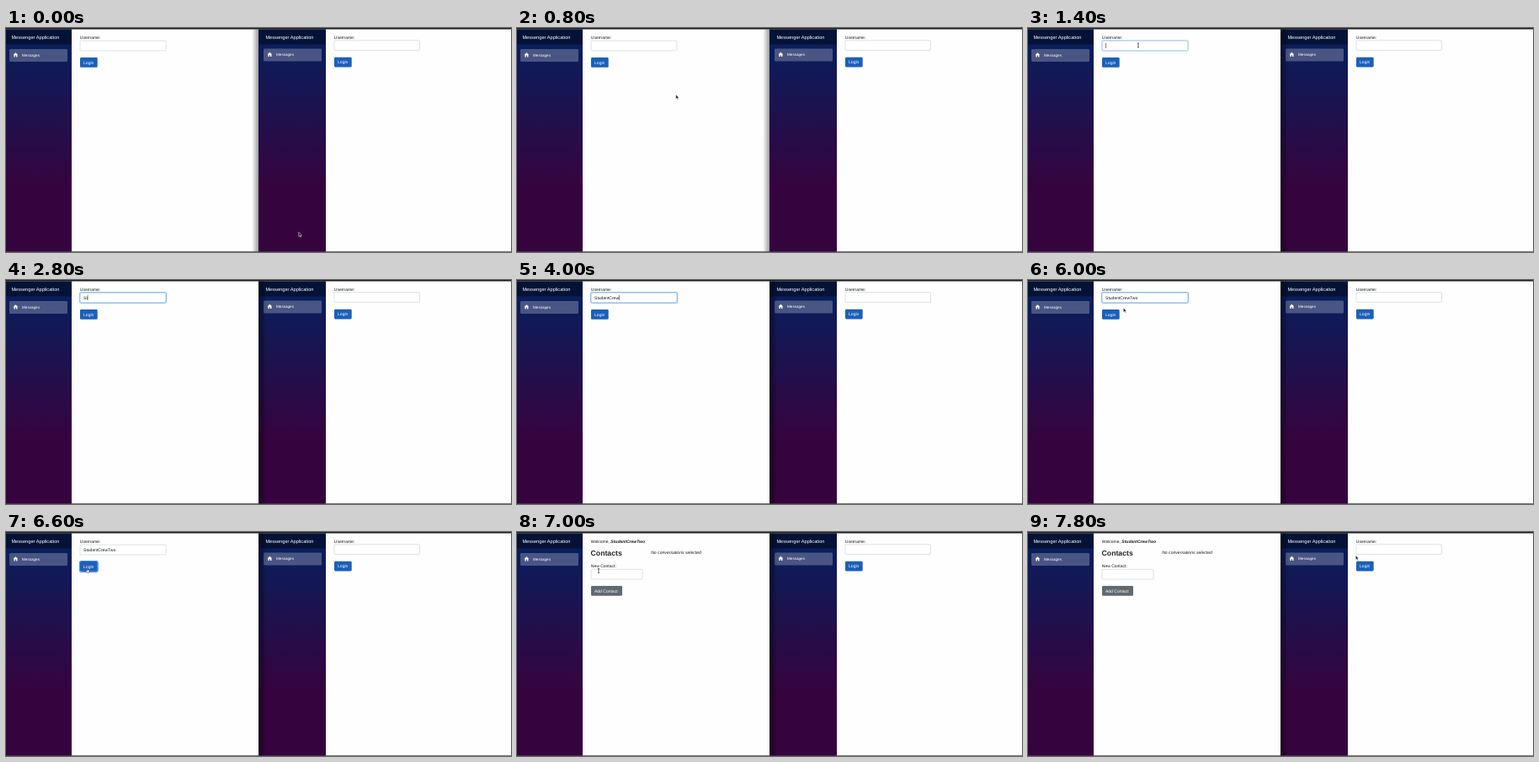
An HTML page for the animation above (8000 ms loop, 600x266 px).

```html
<!DOCTYPE html>
<html lang="en">
<head>
<meta charset="utf-8">
<title>Messenger Application</title>
<style>
html, body { margin: 0; width: 100%; height: 100%; overflow: hidden; background: #fefefe; }
svg { display: block; width: 100vw; height: 100vh; }
text { font: 5px "Liberation Sans", Arial, sans-serif; fill: #15181b; text-rendering: geometricPrecision; white-space: pre; }
.brand { font-size: 5.68px; fill: #fff; }
.nav { font-size: 4.6px; fill: #fff; }
.label { fill: #fff; }
.head { font-size: 8.7px; font-weight: bold; fill: #212529; }
.note { font-size: 5.1px; font-style: italic; }
.name { font-weight: bold; font-style: italic; }
.field { fill: #fff; stroke: #ced4da; stroke-width: .7; }
</style>
</head>
<body>
<svg viewBox="0 0 600 266" preserveAspectRatio="none">
  <defs>
    <linearGradient id="side" x1="0" y1="0" x2="0" y2="1">
      <stop offset="0" stop-color="#04215f"/>
      <stop offset=".7" stop-color="#35043f"/>
    </linearGradient>
    <linearGradient id="shadeL"><stop stop-color="#000" stop-opacity="0"/><stop offset="1" stop-color="#000" stop-opacity=".38"/></linearGradient>
    <linearGradient id="shadeR"><stop stop-color="#000" stop-opacity=".5"/><stop offset="1" stop-color="#000" stop-opacity="0"/></linearGradient>
    <g id="frame">
      <rect x="-2" y="1.5" width="80" height="265" fill="url(#side)"/>
      <rect x="-2" y="1.5" width="80" height="18" fill="#000" opacity=".42"/>
      <text class="brand" x="6.4" y="12.6">Messenger Application</text>
    </g>
    <g id="menu">
      <rect x="4" y="25" width="69" height="15" rx="1.3" fill="#fff" opacity=".25"/>
      <path d="M8.6 32 11.4 29.2 14.2 32H13.4V34.4H12V32.6H10.8V34.4H9.4V32Z" fill="#fff"/>
      <text class="nav" x="19" y="33.8">Messages</text>
    </g>
    <g id="prompt"><text x="87.8" y="13.1">Username:</text></g>
    <g id="login">
      <rect x="88" y="35.1" width="20.7" height="11.7" rx="1.3" fill="#1b60b9"/>
      <text class="label" x="92.1" y="42.7">Login</text>
    </g>
  </defs>

  <rect width="600" height="266" fill="#fefefe"/>
  <use href="#frame"/>
  <use href="#menu"/>

  <g id="signIn">
    <use href="#prompt"/>
    <rect id="ring" x="87.6" y="14.7" width="103" height="12.7" rx="1.8" fill="none" stroke="#9cc5f6" stroke-width="1.3"/>
    <rect id="box" class="field" x="88" y="15.1" width="102" height="11.8" rx="1.3"/>
    <text id="typed" x="92.1" y="22.8"></text>
    <rect id="caret" y="18" width=".6" height="6" fill="#222"/>
    <rect id="press" x="87.4" y="34.5" width="21.9" height="12.9" rx="1.9" fill="#fff" stroke="#3f92f0" stroke-width="1.1"/>
    <use href="#login"/>
  </g>

  <g id="contacts">
    <text x="87.8" y="13.1">Welcome, <tspan class="name" id="who"></tspan></text>
    <text class="head" x="87.6" y="28.3">Contacts</text>
    <text class="note" x="159.2" y="25.7">No conversations selected</text>
    <text x="87.8" y="42.2">New Contact:</text>
    <rect class="field" x="88" y="44.3" width="61" height="11.8" rx="1.3"/>
    <rect x="88" y="64" width="37" height="11.8" rx="1.3" fill="#626a71"/>
    <text class="label" x="92" y="71.7">Add Contact</text>
  </g>

  <rect id="overLeft" x="292" y="1.5" width="8" height="265" fill="url(#shadeL)"/>
  <g transform="translate(302)">
    <use href="#frame"/>
    <g transform="translate(0 -.4)">
      <use href="#menu"/>
      <use href="#prompt"/>
      <rect class="field" x="88" y="15.1" width="101.5" height="11.8" rx="1.3"/>
      <use href="#login"/>
    </g>
  </g>
  <rect id="overRight" x="300" y="1.5" width="9" height="265" fill="url(#shadeR)"/>
  <rect width="600" height="1.5" fill="#1d1d1f"/>
  <rect y="265.3" width="600" height=".7" fill="#444"/>

  <g id="mouse">
    <path id="arrow" d="M0 0V5.2L1.2 4.1 2 6 2.9 5.6 2.1 3.8H3.7Z" fill="#111" stroke="#fff" stroke-width=".5"/>
    <path id="beam" d="M-1-2.7Q0-2.7 0-2Q0-2.7 1-2.7M0-2V2M-1 2.7Q0 2.7 0 2Q0 2.7 1 2.7" fill="none" stroke="#222" stroke-width=".7"/>
    <path id="hand" d="M-.5-2.2Q0-2.8.4-2.2V-.4L2-.1Q2.5.1 2.4.7L1.8 2.8H-.9L-2.2.9Q-2.2.2-1.5.4L-.5 1Z" fill="#fff" stroke="#111" stroke-width=".5"/>
  </g>
</svg>
<script>
const LOOP = 8000, TICK = 200, USER = "StudentCrewTwo";
const $ = id => document.getElementById(id);
const show = (id, on) => $(id).setAttribute("visibility", on ? "visible" : "hidden");

// [time, letters typed]
const keys = [[0, 0], [2600, 1], [2800, 2], [3000, 4], [3200, 6], [3400, 7],
  [3800, 9], [4000, 11], [4800, 12], [5000, 13], [5200, 14]];
// [time, caret visible]
const blinks = [[0, 0], [1400, 1], [2000, 0], [2400, 1], [4600, 0], [4800, 1],
  [5600, 0], [6200, 1], [6400, 0]];
// [time, pointer shape]
const shapes = [[0, "arrow"], [1200, "beam"], [2600, ""], [5600, "beam"],
  [6000, "arrow"], [6200, "hand"], [7000, "beam"], [7400, "arrow"]];
// [time, x, y]
const path = [[0, 347.8, 242.3], [1200, 133, 22], [1400, 131, 20.5], [2000, 130, 21],
  [5600, 130, 21], [6400, 96.7, 45.2], [7000, 97, 46], [7200, 97, 46], [7800, 389.3, 27.8]];

const at = (table, t) => table.filter(row => row[0] <= t).pop()[1];

function pointer(t) {
  const i = path.findLastIndex(p => p[0] <= t);
  const a = path[i], b = path[i + 1] || a;
  const u = b === a ? 0 : (t - a[0]) / (b[0] - a[0]);
  const e = u * u * (3 - 2 * u);
  return [a[1] + (b[1] - a[1]) * e, a[2] + (b[2] - a[2]) * e];
}

function draw(t) {
  const inside = t >= 6800, leftActive = t >= 1200;
  const focus = t >= 1400 && t < 6400;
  $("signIn").style.display = inside ? "none" : "";
  $("contacts").style.display = inside ? "" : "none";
  show("overLeft", !leftActive);
  show("overRight", leftActive);

  $("typed").textContent = USER.slice(0, at(keys, t));
  $("caret").setAttribute("x", 92 + $("typed").getComputedTextLength());
  $("caret").style.opacity = at(blinks, t);
  $("ring").style.opacity = focus ? (t < 1600 ? .35 : 1) : 0;
  $("box").style.stroke = focus ? "#7fb0ec" : "";
  $("press").style.opacity = t >= 6600 ? 1 : 0;

  const shape = at(shapes, t);
  for (const id of ["arrow", "beam", "hand"]) show(id, id === shape);
  $("mouse").setAttribute("transform", `translate(${pointer(t)})`);
}

$("who").textContent = USER;
const start = performance.now();
function loop() {
  const t = (performance.now() - start) % LOOP;
  draw(Math.floor(t / TICK) * TICK);
  requestAnimationFrame(loop);
}
loop();
</script>
</body>
</html>
```
